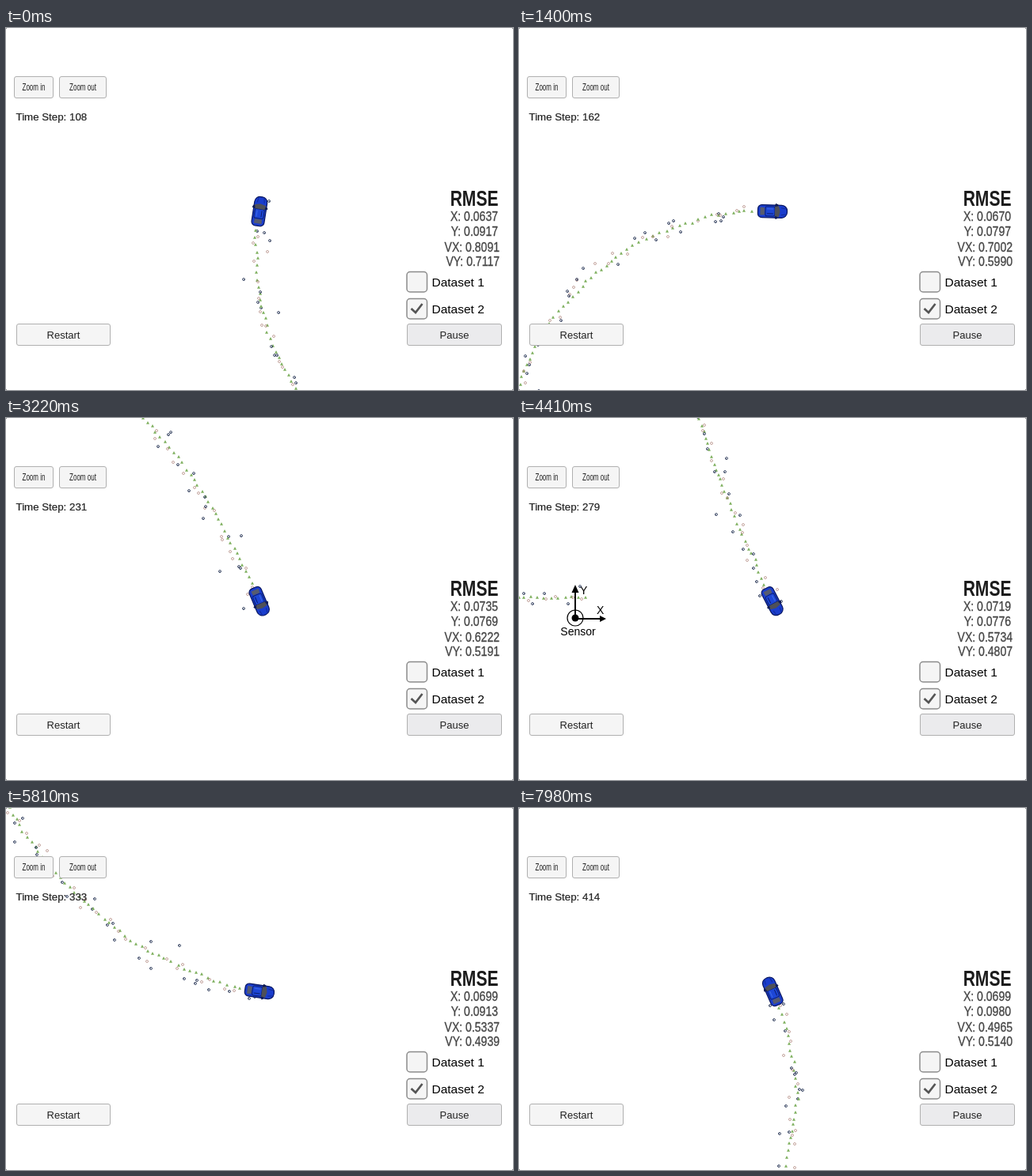
These frames come from a looping animation (640 px wide and 458 px high, 8000 ms). An HTML page with a canvas:

```html
<!DOCTYPE html>
<html lang="en">
<head>
<meta charset="utf-8">
<title>Tracking simulator</title>
<style>
  html, body { margin: 0; width: 100%; height: 100%; overflow: hidden; background: #fff; }
  canvas { display: block; width: 100vw; height: 100vh; }
</style>
</head>
<body>
<canvas id="stage" width="640" height="458"></canvas>
<script>
const ctx = document.getElementById('stage').getContext('2d');
const LOOP = 8000, TICK = 70, STEPS = 415;
const CENTER = { x: 320, y: 232 };
const FONT = '"Liberation Sans", Arial, sans-serif';

// time, step, then the errors of x, y, vx, vy
const readings = [
  [0, 108, .0637, .0917, .8091, .7117],
  [1400, 162, .0670, .0797, .7002, .5990],
  [3220, 231, .0735, .0769, .6222, .5191],
  [4410, 279, .0719, .0776, .5734, .4807],
  [5810, 333, .0699, .0913, .5337, .4939],
  [6790, 369, .0693, .0983, .5117, .5285],
  [7980, 414, .0699, .0980, .4965, .5140],
];

function readingAt(time) {
  let i = 0;
  while (i < readings.length - 2 && time >= readings[i + 1][0]) i++;
  const a = readings[i], b = readings[i + 1];
  const k = (time - a[0]) / (b[0] - a[0]);
  return a.map((v, j) => v + (b[j] - v) * k);
}

let seed = 20;
function random() {
  seed = (seed * 1664525 + 1013904223) % 4294967296;
  return (seed + .5) / 4294967296;
}
const gauss = () => Math.sqrt(-2 * Math.log(random())) * Math.cos(2 * Math.PI * random());

// Figure-eight drive: the yaw rate follows one sine period over 500 steps.
const phase = n => 2 * Math.PI * n / 500;
const heading = n => Math.PI - 2.1884 * (1 - Math.cos(phase(n)));
const stride = n => 8.5 + .05 * Math.cos(phase(n)) - .16 * Math.cos(2 * phase(n));

const path = [{ x: 0, y: 0 }];
for (let n = 0; n < STEPS; n++) {
  const { x, y } = path[n], d = stride(n + .5), a = heading(n + .5);
  path.push({ x: x + d * Math.cos(a), y: y - d * Math.sin(a) });
}
const sensor = { x: path[279].x - 249, y: path[279].y + 21 };

// Each step has an estimate and, in turn, a lidar or a radar reading.
let driftX = 0, driftY = 0;
const marks = path.map((p, n) => {
  driftX = .7 * driftX + gauss();
  driftY = .7 * driftY + gauss();
  const estimate = { x: p.x + driftX, y: p.y + driftY };
  if (n % 2 === 0) {
    return { estimate, reading: { x: p.x + 5 * gauss(), y: p.y + 5 * gauss() } };
  }
  const dx = p.x - sensor.x, dy = p.y - sensor.y;
  const range = Math.hypot(dx, dy) + 9 * gauss();
  const angle = Math.atan2(dy, dx) + .025 * gauss();
  return {
    estimate, angle, radar: true,
    reading: { x: sensor.x + range * Math.cos(angle), y: sensor.y + range * Math.sin(angle) },
  };
});

function text(str, x, y, size, { color = '#222', align = 'left', squeeze = 1, weight = '', bolden = 0 } = {}) {
  ctx.save();
  ctx.translate(x, y);
  ctx.scale(squeeze, 1);
  ctx.font = `${weight} ${size}px ${FONT}`;
  ctx.textAlign = align;
  ctx.fillStyle = ctx.strokeStyle = color;
  ctx.fillText(str, 0, 0);
  if (bolden) {
    ctx.lineWidth = bolden;
    ctx.strokeText(str, 0, 0);
  }
  ctx.restore();
}

function shape(points, color) {
  ctx.beginPath();
  points.forEach(([x, y]) => ctx.lineTo(x, y));
  ctx.closePath();
  ctx.fillStyle = color;
  ctx.fill();
}

function line(points, color, width) {
  ctx.beginPath();
  points.forEach(([x, y]) => ctx.lineTo(x, y));
  ctx.strokeStyle = color;
  ctx.lineWidth = width;
  ctx.stroke();
}

function box(x, y, w, h, r, fill, stroke, width = 1) {
  ctx.beginPath();
  ctx.roundRect(x, y, w, h, r);
  ctx.fillStyle = fill;
  ctx.fill();
  ctx.strokeStyle = stroke;
  ctx.lineWidth = width;
  ctx.stroke();
}

function disc(x, y, r, fill, stroke, width) {
  ctx.beginPath();
  ctx.arc(x, y, r, 0, 7);
  if (fill) { ctx.fillStyle = fill; ctx.fill(); }
  if (stroke) { ctx.strokeStyle = stroke; ctx.lineWidth = width; ctx.stroke(); }
}

function drawSensor(x, y) {
  ctx.save();
  ctx.translate(x, y);
  disc(0, 0, 10, null, '#000', 1.2);
  disc(0, 0, 4.5, '#000');
  line([[0, 0], [0, -34]], '#000', 2);
  line([[0, 1], [33, 1]], '#000', 2);
  shape([[0, -42], [4.5, -32], [-4.5, -32]], '#000');
  shape([[39, 1], [31, -3], [31, 5]], '#000');
  text('Y', 6, -30, 14, { color: '#000' });
  text('X', 27, -5, 14, { color: '#000' });
  text('Sensor', 3.5, 22, 14, { color: '#000', align: 'center' });
  ctx.restore();
}

function drawTrail(step, toScreen) {
  for (const { estimate, reading, radar, angle } of marks.slice(0, step + 1)) {
    const e = toScreen(estimate), r = toScreen(reading);
    shape([[e.x, e.y - 2], [e.x + 2, e.y + 1.7], [e.x - 2, e.y + 1.7]], '#7fb05f');
    if (radar) {
      disc(r.x, r.y, 1.5, null, '#2a3858', .85);
      line([[r.x, r.y], [r.x - 1.6 * Math.cos(angle), r.y - 1.6 * Math.sin(angle)]], '#2a3858', .8);
    } else {
      disc(r.x, r.y, 1.5, null, '#a8796e', .65);
    }
  }
}

function drawCar(angle) {
  ctx.save();
  ctx.translate(CENTER.x, CENTER.y);
  ctx.rotate(-angle);
  box(-18.5, -8, 37, 16, [5, 7, 7, 5], '#1a3dcd', '#0a1862', 1.2);
  shape([[4, -10], [7, -9], [6, 9], [4, 10], [3, 8], [3, -8]], '#0f1b55');
  box(-9, -6, 12, 12, 2, '#1d46d6', '#0d2070', 1);
  line([[-7, -3], [1, -3]], '#3f6cea', 1);
  line([[-7, 3], [1, 3]], '#0d2070', 1);
  shape([[3, -6], [8, -7], [9.5, 0], [8, 7], [3, 6]], '#4e5058');
  shape([[-15.5, -5], [-10, -4.5], [-10, 4.5], [-15.5, 5]], '#565c70');
  line([[11, -4.5], [17, -3.5]], '#122b98', 1);
  line([[11, 4.5], [17, 3.5]], '#122b98', 1);
  ctx.restore();
}

function button(label, x, y, w, size, squeeze, fill) {
  box(x + .5, y + .5, w, 27, 2.5, fill, '#b0b0b0');
  text(label, x + w / 2 + .5, y + 14 + size * .36, size, { align: 'center', squeeze });
}

function drawPanel(step, errors) {
  button('Zoom in', 10, 61, 49, 12, .67, '#f5f5f5');
  button('Zoom out', 67, 61, 59, 12, .67, '#f5f5f5');
  button('Restart', 13, 374, 118, 13, 1, '#f5f5f5');
  button('Pause', 506, 374, 119, 13, 1, '#ebebed');
  text(`Time Step: ${step}`, 12.5, 117, 13.3, { bolden: .2 });

  text('RMSE', 621.5, 225, 27, { color: '#1c1c1c', align: 'right', squeeze: .78, weight: 'bold' });
  [['X', 621, 244], ['Y', 621, 263], ['VX', 623, 283], ['VY', 623, 301]].forEach(([name, x, y], i) =>
    text(`${name}: ${errors[i].toFixed(4)}`, x, y, 16.5, { color: '#444', align: 'right', squeeze: .85, bolden: .35 }));

  [308, 342].forEach((y, i) => {
    box(506, y + .5, 25.5, 25.5, 4, '#f5f5f5', '#8c8c8c', 1.5);
    text(`Dataset ${i + 1}`, 537.5, y + 18.5, 15.5, { color: '#000' });
  });
  line([[511.5, 355], [517, 360], [525.5, 349]], '#555', 2.7);

  ctx.fillStyle = '#888';
  for (const x of [0, 639]) for (const y of [0, 457]) ctx.fillRect(x, y, 1, 1);
}

function draw(time) {
  const [, exactStep, ...errors] = readingAt(Math.floor(time / TICK) * TICK);
  const step = Math.round(exactStep), car = path[step];
  const toScreen = p => ({
    x: Math.round(p.x - car.x + CENTER.x),
    y: Math.round(p.y - car.y + CENTER.y),
  });
  ctx.fillStyle = '#fff';
  ctx.fillRect(0, 0, 640, 458);
  const s = toScreen(sensor);
  drawSensor(s.x, s.y);
  drawTrail(step, toScreen);
  drawCar(heading(step));
  drawPanel(step, errors);
}

const start = performance.now();
function tick() {
  draw((performance.now() - start) % LOOP);
  requestAnimationFrame(tick);
}
tick();
</script>
</body>
</html>
```
